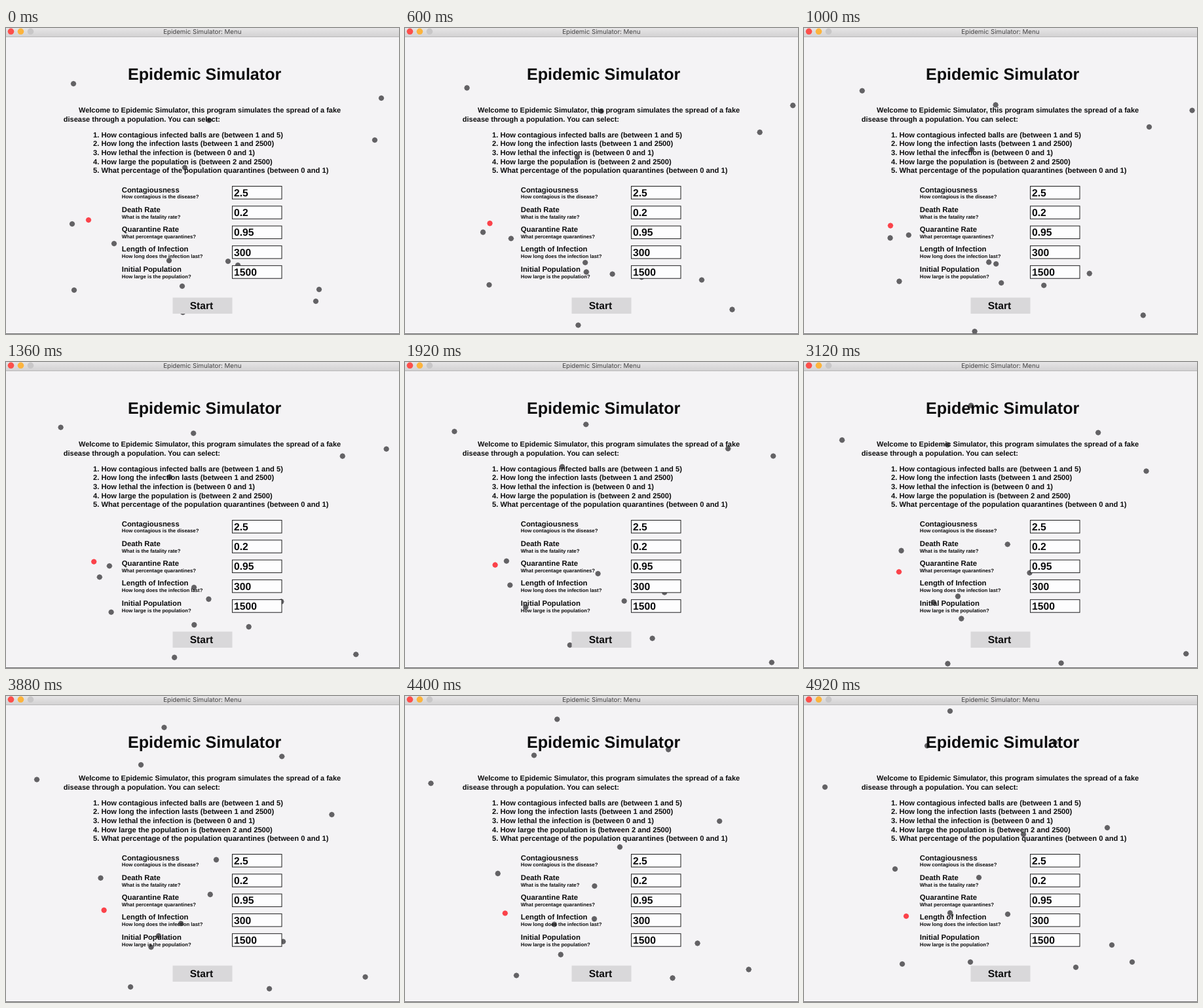
These frames come from a looping animation (600 by 467 pixels, 5000 ms). An HTML page with a canvas:

```html
<!DOCTYPE html>
<html lang="en">
<head>
<meta charset="utf-8">
<title>Epidemic Simulator: Menu</title>
<style>
  html, body { margin: 0; width: 600px; height: 467px; overflow: hidden; background: #f4f3f5; }
  canvas { display: block; }
</style>
</head>
<body>
<canvas id="stage" width="600" height="467"></canvas>
<script>
const ctx = document.getElementById('stage').getContext('2d');
const LOOP = 5000, STEP = 40, LAST = 123, LAG = 0.5;
const RIGHT = 599, BOTTOM = 465;
const BACK = '#f4f3f5', INK = '#0c0c0d', GREY = '#636265', RED = '#fb424a';

// Each ball glides straight between two points; beyond a wall the path is mirrored back.
const healthy = [
  [103, 85, 32, 139], [573, 107, 735, 201], [563, 171, 383, 71],
  [310, 141, 223, 23], [273, 213, 188, 76], [101, 299, 254, 406],
  [165, 329, 139, 264], [249, 355, 470, 380], [339, 356, 150, 521],
  [354, 362, 415, 516], [104, 400, 311, 333], [269, 394, 335, 211],
  [478, 399, 267, 277], [473, 417, 697, 524], [270, 434, 223, 599]
];
const infected = [126, 293, 156, 336];

const items = [
  'How contagious infected balls are (between 1 and 5)',
  'How long the infection lasts (between 1 and 2500)',
  'How lethal the infection is (between 0 and 1)',
  'How large the population is (between 2 and 2500)',
  'What percentage of the population quarantines (between 0 and 1)'
];

const fields = [
  ['Contagiousness', 'How contagious is the disease?', '2.5'],
  ['Death Rate', 'What is the fatality rate?', '0.2'],
  ['Quarantine Rate', 'What percentage quarantines?', '0.95'],
  ['Length of Infection', 'How long does the infection last?', '300'],
  ['Initial Population', 'How large is the population?', '1500']
];

function rect(x, y, w, h, color) {
  ctx.fillStyle = color;
  ctx.fillRect(x, y, w, h);
}

function dot(x, y, r, color) {
  ctx.fillStyle = color;
  ctx.beginPath();
  ctx.arc(x, y, r, 0, 2 * Math.PI);
  ctx.fill();
}

function text(str, x, y, size) {
  ctx.font = `bold ${size}px "Liberation Sans", Arial, sans-serif`;
  ctx.fillStyle = INK;
  ctx.fillText(str, x, y);
}

const bounce = (pos, wall) => wall - Math.abs(wall - pos);

function drawBall([x0, y0, x1, y1], progress, color) {
  const x = bounce(x0 + (x1 - x0) * progress, RIGHT);
  const y = bounce(y0 + (y1 - y0) * progress, BOTTOM);
  ctx.fillStyle = color;
  ctx.beginPath();
  for (let a = 0; a < 8; a++)
    ctx.lineTo(x + 4.3 * Math.cos(a * Math.PI / 4), y + 4.3 * Math.sin(a * Math.PI / 4));
  ctx.fill();
}

function drawTitleBar() {
  const shade = ctx.createLinearGradient(0, 0, 0, 13);
  shade.addColorStop(0, '#e6e5e6');
  shade.addColorStop(1, '#d3d2d3');
  rect(0, 0, 600, 13, shade);
  rect(0, 13, 600, 1, '#b9b8b9');
  ['#fc4f4b', '#fcb43d', '#c8c7c8'].forEach((color, i) => dot(7.5 + 15 * i, 5.3, 4.8, color));
  ctx.font = '9.7px Inter, sans-serif';
  ctx.fillStyle = '#434243';
  ctx.textAlign = 'center';
  ctx.fillText('Epidemic Simulator: Menu', 299.8, 9.2);
  ctx.textAlign = 'left';
}

function drawField([label, hint, value], i) {
  const y = 241 + 30.3 * i;
  text(label, 176.8, y + 9.5, 11.3);
  text(hint, 176.8, y + 19.3, 7.75);
  rect(345, y, 76.5, 20.5, '#1c1c1d');
  rect(346, y + 1, 74.5, 18.5, '#fdfdfe');
  text(value, 348, y + 15.7, 15.7);
}

function drawForm() {
  text('Epidemic Simulator', 186, 79, 25.1);
  text('Welcome to Epidemic Simulator, this program simulates the spread of a fake', 111, 129, 11);
  text('disease through a population. You can select:', 87.8, 143, 11);
  items.forEach((item, i) => text(`${i + 1}. ${item}`, 133, 166.8 + 13.65 * i, 11.18));
  fields.forEach(drawField);
  rect(254.5, 411.5, 91, 24.5, '#d9d8da');
  text('Start', 280.7, 429.3, 15.6);
}

function draw(now) {
  const step = Math.min(Math.floor(now % LOOP / STEP), LAST);
  const progress = Math.max(step - LAG, 0) / (LAST - LAG);
  rect(0, 0, 600, 467, BACK);
  healthy.forEach(ball => drawBall(ball, progress, GREY));
  drawBall(infected, progress, RED);
  drawForm();
  drawTitleBar();
  rect(0, 466, 600, 1, '#6f6e70');
}

ctx.textRendering = 'geometricPrecision';
const start = performance.now();
function tick() {
  draw(performance.now() - start);
  requestAnimationFrame(tick);
}
tick();
</script>
</body>
</html>
```
